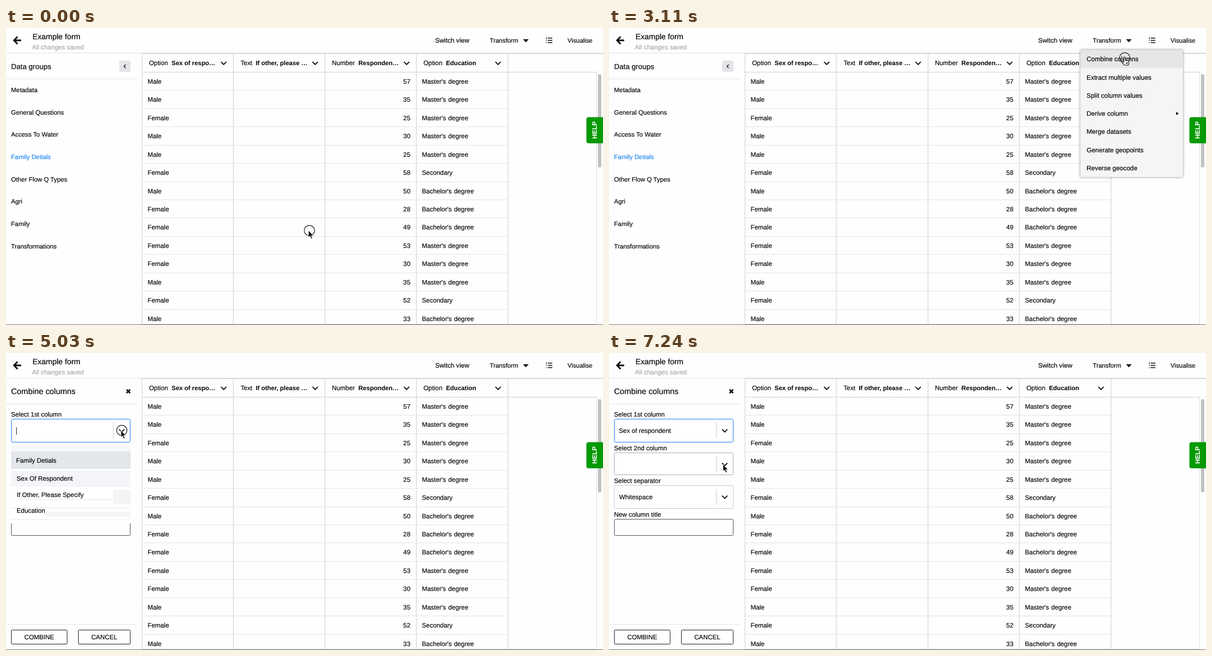
Write an HTML page that moves like this. It is 1060 by 528 pixels and loops after 8 s.

```html
<!DOCTYPE html>
<html lang="en">
<head>
<meta charset="utf-8">
<title>Combine columns</title>
<style>
html, body { margin: 0; width: 100%; height: 100%; overflow: hidden; background: #fefefe; }
svg { display: block; width: 1060px; height: 528px; }
text {
  font: 11.4px "Liberation Sans", Arial, sans-serif; white-space: pre; text-rendering: geometricPrecision;
  color: #000; fill: currentColor; stroke: currentColor; stroke-width: .15px;
}
.bold { font-weight: bold; font-size: 11.1px; stroke: none; }
.icon { fill: none; stroke: #111; stroke-width: 1.9; }
.crisp { shape-rendering: crispEdges; }
</style>
</head>
<body>
<svg id="stage" viewBox="0 0 1060 528"></svg>
<script>
const text = (x, y, s, attrs = '') => `<text x="${x}" y="${y}" ${attrs}>${s}</text>`;
const rect = (x, y, w, h, fill, attrs = '') =>
  `<rect x="${x}" y="${y}" width="${w}" height="${h}" fill="${fill}" ${attrs}/>`;
const icon = (d, attrs = '') => `<path class="icon" d="${d}" ${attrs}/>`;
const chevron = (x, y) => icon(`M${x - 4.7} ${y - 2.3}l4.7 4.7 4.7-4.7`);
const box = (y, h, stroke, id = '') =>
  rect(9.5, y + .5, 211, h, '#fff', `stroke="${stroke}" rx="2" ${id && `id="${id}"`}`);
const group = (id, body) => `<g id="${id}">${body}</g>`;
const size = px => `style="font-size:${px}px"`;

function topBar() {
  return icon('M27 22H15M20.5 15.5L14.2 22l6.3 6.5', 'style="stroke-width:2.8"') +
    text(47, 20, 'Example form', size(13.8)) +
    text(46, 38, 'All changes saved', 'style="color:#a6a6a6"') +
    text(762, 26, 'Switch view', size(11.6)) +
    text(859, 26, 'Transform', size(11.2)) +
    '<path d="M918 20h10l-5 5.5z" fill="#111"/>' +
    icon('M962 18h8M962 22h8M962 26h8', 'style="stroke-width:1.5"') +
    icon('M959.5 16.5v3M958.5 22h2M958.5 26h2', 'style="stroke-width:1.2"') +
    text(997, 26, 'Visualise', size(11.1)) +
    rect(0, 44, 1060, 1, '#e2e2e2');
}

function table() {
  const columns = [['Option', 'Sex of respo…', 40], ['Text', 'If other, please …', 27],
    ['Number', 'Responden…', 47], ['Option', 'Education', 40]];
  const ages = [57, 35, 25, 30, 25, 58, 50, 28, 49, 53, 30, 35, 52, 33];
  const degrees = { M: "Master's degree", S: 'Secondary', B: "Bachelor's degree" };
  const lines = [rect(241, 45, 819, 1, '#d0d0d0'), rect(241, 78, 807, 1, '#d0d0d0')];
  for (let i = 0; i < 5; i++) lines.push(rect(Math.round(241 + i * 162.4), 45, 1, 482, '#d0d0d0'));
  let out = columns.map(([type, title, gap], i) => {
    const x = 254 + i * 162.4;
    return text(x, 66, type) + text(x + gap, 66, title, 'class="bold"') + chevron(x + 132.5, 62.5);
  }).join('');
  ages.forEach((age, i) => {
    const y = 99 + i * 32.43;
    if (i) lines.push(rect(241, Math.round(78 + i * 32.43), 650, 1, '#e4e4e4'));
    out += text(251.5, y, 'MMFMMFMFFFFMFM'[i] === 'M' ? 'Male' : 'Female') +
      text(718, y, age, 'text-anchor="end"') +
      text(738.5, y, degrees['MMMMMSBBBMMMSB'[i]], 'word-spacing=".9"');
  });
  lines.push(rect(1048, 78, 1, 449, '#dedede'), rect(241, 526, 807, 1, '#cfcfcf'),
    rect(0, 527, 1060, 1, '#777'));
  return `<g class="crisp">${lines.join('')}</g>` + out +
    rect(1051, 82, 6, 166, '#c1c1c1', 'rx="3"');
}

function groupsPanel() {
  const names = ['Metadata', 'General Questions', 'Access To Water', 'Family Detials',
    'Other Flow Q Types', 'Agri', 'Family', 'Transformations'];
  return text(9, 73, 'Data groups', size(13.1)) +
    rect(201, 58, 20, 20, '#e3e4e8', 'rx="3"') +
    icon('M212.5 65l-3 3.2 3 3.2', 'style="stroke-width:1.3"') +
    names.map((name, i) => text(9, 114.2 + i * 39.63, name,
      `style="font-size:11.25px;${i === 3 ? 'color:#1a84f0' : ''}"`)).join('');
}

function combinePanel() {
  const select = (y, label, h, id) => text(9, y - 4, label) + box(y, h, '#ccc', id) +
    rect(190, y + 7, 1, 28, '#ccc') + chevron(205.5, y + 21);
  return text(9, 73, 'Combine columns', size(14.3)) +
    icon('M214 65l6.4 6.4M220.4 65l-6.4 6.4', 'style="stroke-width:2.7"') +
    select(117, 'Select 1st column', 41, 'first') +
    select(177, 'Select 2nd column', 39, 'second') +
    select(235, 'Select separator', 41) +
    text(18, 260, 'Whitespace') +
    text(9, 291, 'New column title') + box(295, 29, '#555') +
    text(17.5, 142, 'Sex of respondent', 'id="value"') +
    rect(0, 482, 232, 1, '#e4e4e4') +
    [[9, 100, 'COMBINE'], [128, 93, 'CANCEL']].map(([x, w, label]) =>
      rect(x + .5, 492.5, w - 1, 25, '#fff', 'stroke="#222" rx="1"') +
      text(x + w / 2, 509, label, 'text-anchor="middle"')).join('') +
    group('options', rect(18, 132, 1, 13, '#222') +
      rect(9, 165, 212, 138, '#fff') +
      rect(9, 165, 212, 10, '#f6f7f9', 'id="strip"') +
      rect(9, 175, 212, 31, '#e3e6ea') + rect(9, 209, 212, 29, '#f4f5f8', 'id="option"') +
      rect(190, 243, 31, 26, '#f3f4f6') + rect(19, 259, 171, 3, '#f4f5f7') +
      rect(9, 274, 212, 3, '#f5f6f8') + rect(70, 282, 151, 9, '#f4f5f7') +
      rect(9, 295, 212, 2, '#f3f4f6') +
      text(18, 194.5, 'Family Detials') + text(19, 227, 'Sex Of Respondent') +
      text(19, 256, 'If Other, Please Specify') + text(19, 284, 'Education'));
}

function transformMenu() {
  const items = ['Combine columns', 'Extract multiple values', 'Split column values',
    'Derive column', 'Merge datasets', 'Generate geopoints', 'Reverse geocode'];
  return rect(837, 39, 182, 226, '#f5f5f7', 'style="filter:drop-shadow(0 0 2px #0007)"') +
    rect(837, 39, 182, 32, '#e6e6e9', 'id="hover"') +
    items.map((item, i) => text(848, 59.4 + i * 32.25, item, size(11.5))).join('') +
    '<path d="M1007 149v6l4.5-3z" fill="#111"/>';
}

const help = rect(1030.5, 158.5, 40, 46.5, '#059a05', 'rx="4"') +
  text(0, 0, 'HELP', 'text-anchor="middle" transform="translate(1049.2 181.5) rotate(-90)" ' +
    'style="color:#fff;font-weight:bold;font-size:11.6px"');

const cursor = '<circle id="ring" cx="1.7" cy="0" r="9.2" fill="none" stroke="#222" stroke-width="1.2"/>' +
  '<path id="arrow" d="M0 0V12.5L2.9 9.9 5 15 7.2 14 5.1 9.2H9Z" stroke="#fff" stroke-width=".9"/>' +
  '<path id="hand" d="M0 0c0-2 2.6-2 2.6 0V4.5l5.2 1.3q1.7.5 1.3 2.4L8 13H1L-2.8 8.2q-.4-2 1.2-1.3L0 8ZM4.5 8v3M6.3 8v3" fill="#fff" stroke="#111" stroke-width="1.1"/>';

const stage = document.getElementById('stage');
stage.innerHTML = topBar() + rect(0, 90, 232, 1, '#e4e4e4') + group('groups', groupsPanel()) +
  group('combine', combinePanel()) + table() + group('menu', transformMenu()) + help +
  group('cursor', cursor);

const part = Object.fromEntries([...stage.querySelectorAll('[id]')].map(el => [el.id, el]));
const show = (name, on) => part[name].setAttribute('visibility', on ? 'inherit' : 'hidden');

// Cursor tip: [step, x, y]
const path = [[0, 537, 360], [8, 891, 23], [9, 891, 28.7], [11, 891, 22], [15, 892, 22], [20, 914, 53],
  [23, 914, 53], [25, 316, 170], [26, 316, 170], [27, 245, 164], [28, 217, 155], [31, 204, 137.5],
  [35, 204, 137.5], [41, 159, 224.5], [45, 159, 224.5], [49, 202.5, 198]];
const clicks = [0, 9, 13, 21, 34, 42, 43];

function cursorAt(step) {
  const i = path.findIndex(key => key[0] >= step);
  if (i < 0) return path.at(-1).slice(1);
  if (i === 0) return path[0].slice(1);
  const [s0, x0, y0] = path[i - 1], [s1, x1, y1] = path[i];
  const u = (step - s0) / (s1 - s0), k = u * u * (3 - 2 * u);
  return [x0 + (x1 - x0) * k, y0 + (y1 - y0) * k];
}

function draw(now) {
  const step = Math.min(49, Math.floor((now % 8000 + 8) / 147.9));
  const [x, y] = cursorAt(step);
  const menuOpen = step >= 13 && step < 22;
  const optionsOpen = step >= 34 && step < 44;
  const pointing = menuOpen && y > 39;
  const overOption = optionsOpen && y > 209;

  show('groups', step < 22);
  show('combine', step >= 22);
  show('menu', menuOpen);
  part.menu.setAttribute('opacity', step === 13 ? .5 : 1);
  show('hover', pointing);
  show('options', optionsOpen);
  show('strip', optionsOpen && !overOption);
  show('value', step >= 44);
  for (const name of ['hover', 'strip', 'value']) {
    if (part[name].getAttribute('visibility') === 'inherit') part[name].removeAttribute('visibility');
  }
  part.option.setAttribute('fill', overOption ? '#b2d4ff' : '#f4f5f8');
  part.first.setAttribute('stroke', step >= 34 ? '#2684ff' : step >= 29 ? '#b3b3b3' : '#ccc');
  part.second.setAttribute('stroke', step >= 47 ? '#b0b0b0' : '#ccc');

  part.cursor.setAttribute('transform', `translate(${x} ${y})`);
  show('ring', clicks.includes(step));
  show('hand', pointing);
  show('arrow', !pointing);
  requestAnimationFrame(() => draw(performance.now() - start));
}
const start = performance.now();
draw(0);
</script>
</body>
</html>
```
